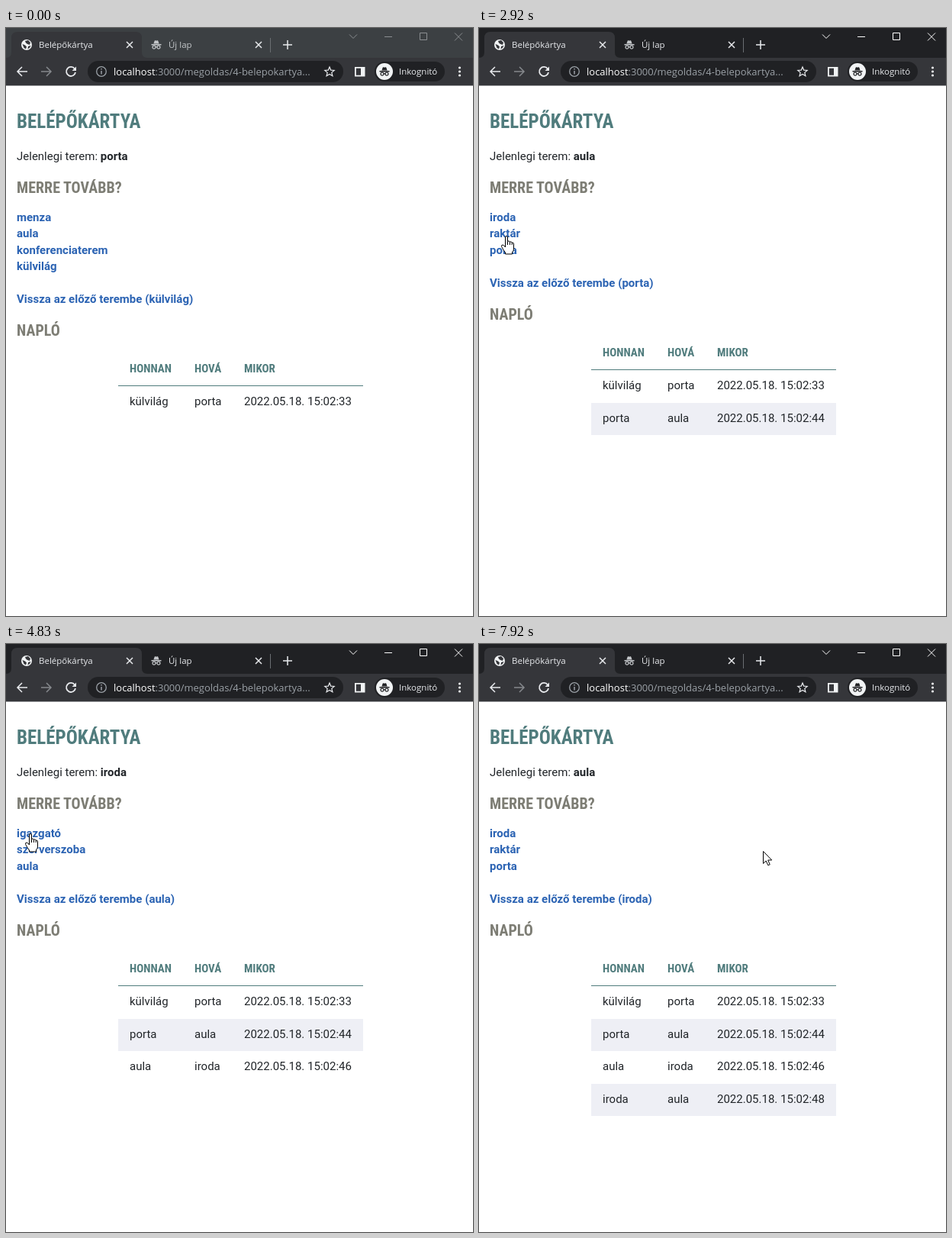
Recreate the animation shown at these times as an HTML page. Size 612x770 px, loop 8000 ms.

```html
<!DOCTYPE html>
<html lang="hu">
<head>
<meta charset="utf-8">
<title>Belépőkártya</title>
<style>
  html, body { margin: 0; width: 100%; height: 100%; overflow: hidden; background: #fff; }
  svg { display: block; }
  text { font-family: Roboto, sans-serif; font-size: 15px; fill: #212529; white-space: pre; }
  .b { font-weight: 700; }
  .link { font-weight: 700; fill: #2b63b3; }
  .head { font-family: "Roboto Condensed", Roboto, sans-serif; font-stretch: 75%; font-weight: 700; fill: #507c7d; }
  .h1 { font-size: 25px; }
  .h2 { font-size: 20px; fill: #7d7d74; }
  .ui text { font-family: "Open Sans", "Noto Sans", sans-serif; font-size: 11.5px; fill: #e8eaed; }
  .ui .url { font-size: 13px; fill: #9aa0a6; }
  .url tspan { fill: #fff; }
  .line { fill: none; stroke: #e8eaed; stroke-width: 1.5; }
  #strip { fill: #3c4043; }
  #win { stroke: #8b8e91; stroke-width: 1; }
  .inactive { fill: #c4c7ca !important; }
  .focus #strip { fill: #202124; }
  .focus #win { stroke: #fff; }
  .focus .inactive { fill: #e8eaed !important; }
  #arrow, #hand { fill: #fff; stroke: #000; stroke-linejoin: round; }
</style>
</head>
<body>
<svg id="stage" width="612" height="770" viewBox="0 0 612 770">
  <defs>
    <g id="spy">
      <path d="M-3.6-1.5-2.3-5.3Q-2-6-1.2-5.7L0-5.3 1.2-5.7Q2-6 2.3-5.3L3.6-1.5ZM-6.5-.9H6.5V.4H-6.5Z"/>
      <g fill="none" stroke="currentColor" stroke-width="1.2"><circle cx="-3" cy="3.2" r="2"/><circle cx="3" cy="3.2" r="2"/><path d="M-1 3Q0 2.2 1 3"/></g>
    </g>
    <path id="x" d="M-4-4 4 4M4-4-4 4"/>
  </defs>
  <g class="ui">
    <rect id="strip" width="612" height="39"/>
    <path fill="#35363a" d="M0 39Q7 39 7 32V13Q7 5 15 5H170Q178 5 178 13V32Q178 39 185 39H612V75.5H0Z"/>
    <circle cx="27" cy="22" r="7" fill="#f1f3f4"/>
    <path fill="#35363a" d="M21.5 21 25 22.5 27 24.5 26 27.5 23.5 26ZM25 17 29 16 32 19 31 22 28 21 26 19.5ZM29 24 32.5 23 31 26 28.5 27.5Z"/>
    <text x="43" y="26">Belépőkártya</text>
    <text class="inactive" x="213" y="26">Új lap</text>
    <use href="#spy" x="197" y="22" fill="#c4c7ca" color="#c4c7ca"/>
    <g class="line">
      <use href="#x" x="162" y="22"/>
      <use href="#x" x="331" y="22"/>
      <path d="M363 22H375M369 16V28M28 57H15M21 51 15 57 21 63"/>
      <path stroke="#85888c" d="M46 57H59M53 51 59 57 53 63"/>
      <path stroke-width="1.8" d="M90 53.5A6 6 0 1 0 91 58"/>
      <path stroke="none" fill="#e8eaed" d="M92 50.5V56H86.5Z"/>
    </g>
    <path d="M346.5 13V32" stroke="#6b6e72"/>
    <g id="win" fill="none"><path d="M450 8.5 455 13.5 460 8.5M496 11.5H506M542.5 6.5H551.5V15.5H542.5ZM588 6.5 598 16.5M598 6.5 588 16.5"/></g>
    <rect x="107" y="43" width="335" height="28" rx="14" fill="#202124"/>
    <g class="line" stroke="#9aa0a6"><circle cx="125" cy="57" r="6.3" style="stroke:#9aa0a6;stroke-width:1.3"/><path style="stroke:#9aa0a6" d="M125 56V60.5M125 53V54.6"/></g>
    <text class="url" x="141" y="62"><tspan>localhost</tspan>:3000/megoldas/4-belepokartya...</text>
    <path class="line" style="stroke-width:1.2" d="M424 51 425.7 55.1 430.2 55.5 426.8 58.4 427.9 62.8 424 60.4 420.1 62.8 421.2 58.4 417.8 55.5 422.3 55.1Z"/>
    <path fill="#f1f3f4" fill-rule="evenodd" d="M457 51H470.5V63.5H457ZM458.8 52.8V61.7H465V52.8Z"/>
    <rect x="483" y="44" width="92" height="26" rx="13" fill="#202124"/>
    <circle cx="496" cy="57" r="11" fill="#f1f3f4"/>
    <use href="#spy" x="496" y="57" fill="#202124" color="#202124"/>
    <text x="515" y="61">Inkognitó</text>
    <g fill="#f1f3f4"><circle cx="594.5" cy="52" r="1.6"/><circle cx="594.5" cy="57" r="1.6"/><circle cx="594.5" cy="62" r="1.6"/></g>
  </g>
  <g id="page"></g>
  <g id="cursor">
    <path id="arrow" d="M.5.5V16.5L4.2 13 6.8 18.8 9.2 17.8 6.7 12H11.7Z"/>
    <path id="hand" d="M-1.5 14V2Q-1.5.5 0 .5T1.5 2V7.5Q3 6 4.4 8 6 7 7.2 9 9.5 8.5 9.5 11V17Q9.5 20 7.5 21.5V24H-1.5V22Q-4 19-6.3 14.5-7 12-5 12-3.5 12-1.5 15ZM1.5 7.5V12M4.4 8V12M7.2 9V12"/>
  </g>
</svg>
<script>
const $ = id => document.getElementById(id);
const LOOP = 8000, STEP = 1000 / 12, PITCH = 21.4, ROW = 42.5;

const rooms = {
  porta: ['menza', 'aula', 'konferenciaterem', 'külvilág'],
  aula: ['iroda', 'raktár', 'porta'],
  iroda: ['igazgató', 'szerverszoba', 'aula']
};
// each move: start time, from, to, clock seconds
const moves = [
  [0, 'külvilág', 'porta', 33],
  [2910, 'porta', 'aula', 44],
  [4580, 'aula', 'iroda', 46],
  [6830, 'iroda', 'aula', 48]
];
// pointer path: time, x, y
const path = [
  [1500, 579, 612], [1580, 578, 505], [1666, 527, 474], [2330, 36, 272],
  [3160, 36, 272], [3500, 70, 284], [3830, 70, 284], [4250, 32, 248],
  [5160, 32, 248], [5750, 261, 276], [6080, 261, 276], [6330, 22, 334],
  [6660, 190, 334], [6920, 190, 334], [7330, 372, 271]
];

const text = (x, y, s, cls = '') => `<text x="${x}" y="${y}" class="${cls}">${s}</text>`;

function drawPage(n) {
  const log = moves.slice(0, n), [, from, room] = log[n - 1], next = rooms[room];
  const backY = 253 + PITCH * (next.length + 1), top = Math.round(backY + 108);
  const row = (cells, y, cls) => [162, 247, 312].map((x, i) => text(x, y, cells[i], cls)).join('');
  $('page').innerHTML =
    text(14, 131, 'BELÉPŐKÁRTYA', 'head h1') +
    text(14, 173, `Jelenlegi terem: <tspan class="b">${room}</tspan>`) +
    text(14, 216, 'MERRE TOVÁBB?', 'head h2') +
    next.map((r, i) => text(14, Math.round(253 + PITCH * i), r, 'link')).join('') +
    text(14, Math.round(backY), `Vissza az előző terembe (${from})`, 'link') +
    text(14, Math.round(backY + 43), 'NAPLÓ', 'head h2') +
    row(['HONNAN', 'HOVÁ', 'MIKOR'], top - 17, 'head') +
    `<rect x="147" y="${top}" width="321" height="1" fill="#507c7d"/>` +
    log.map(([, a, b, s], i) => {
      const y = Math.round(top + ROW * i);
      return (i % 2 ? `<rect x="147" y="${y + 1}" width="321" height="42" fill="#eeeff5"/>` : '') +
        row([a, b, `2022.05.18. 15:02:${s}`], y + 26);
    }).join('');
  $('stage').classList.toggle('focus', n > 1);
}

function pointerAt(t) {
  const i = path.findIndex(p => p[0] > t);
  if (i < 0) return path[path.length - 1].slice(1);
  const [t0, x0, y0] = path[i - 1], [t1, x1, y1] = path[i];
  let k = (t - t0) / (t1 - t0);
  k = k * k * (3 - 2 * k);
  return [x0 + (x1 - x0) * k, y0 + (y1 - y0) * k];
}

const overLink = (x, y) => [...document.querySelectorAll('.link')].some(el => {
  const b = el.getBBox();
  return x >= b.x && x <= b.x + b.width && y >= b.y && y <= b.y + b.height;
});

let shown = 0;
function frame(now) {
  const t = Math.floor((now % LOOP) / STEP) * STEP;
  const n = moves.filter(m => m[0] <= t).length;
  if (n !== shown) drawPage(shown = n);
  const visible = t >= path[0][0];
  $('cursor').style.display = visible ? '' : 'none';
  if (visible) {
    const [x, y] = pointerAt(t).map(Math.round), hand = overLink(x, y);
    $('cursor').setAttribute('transform', `translate(${x} ${y})`);
    $('hand').style.display = hand ? '' : 'none';
    $('arrow').style.display = hand ? 'none' : '';
  }
  requestAnimationFrame(frame);
}
frame(0);
requestAnimationFrame(frame);
</script>
</body>
</html>
```
